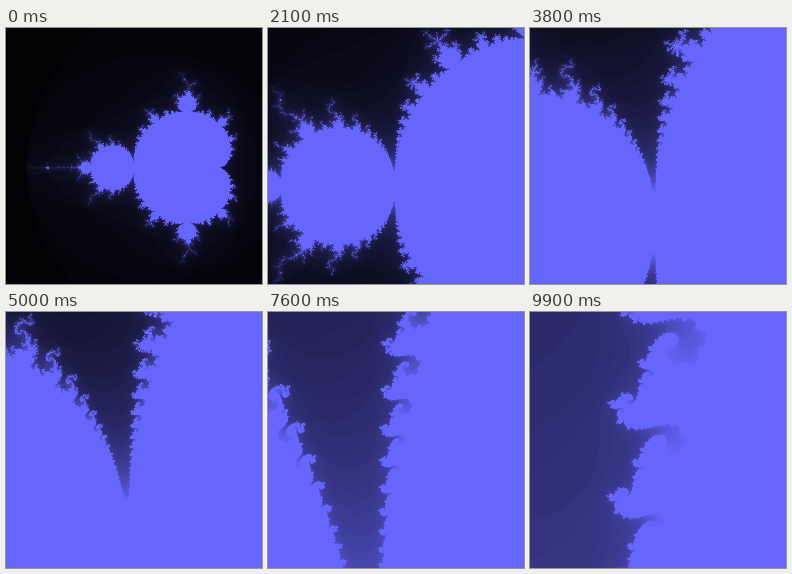
These frames come from a looping animation (256 px wide and 256 px high, 10 s). An HTML page with a canvas:

```html
<!DOCTYPE html>
<html lang="en">
<head>
<meta charset="utf-8">
<title>Seahorse valley zoom</title>
<style>
  html, body { margin: 0; width: 100%; height: 100%; overflow: hidden; background: #000; }
  canvas { display: block; width: 100vw; height: 100vh; }
</style>
</head>
<body>
<canvas id="view" width="256" height="256"></canvas>
<script>
const SIZE = 256;
const STEPS = 100;
const STEP_MS = 100;
const MAX_ITER = 50;
const MAX_ZOOM = 100;
const SPAN = 3;
const CENTER = { re: -0.7435, im: 0.1314 };
const FILL = { dim: 102, blue: 255 };

const ctx = document.getElementById('view').getContext('2d');
const image = ctx.createImageData(SIZE, SIZE);
const pixels = new Uint32Array(image.data.buffer);

// Little-endian ABGR, linear from black to the fill colour
const palette = Array.from({ length: MAX_ITER + 1 }, (_, n) => {
  const k = n / MAX_ITER;
  const dim = Math.floor(FILL.dim * k);
  const blue = Math.floor(FILL.blue * k);
  return (255 << 24 | blue << 16 | dim << 8 | dim) >>> 0;
});

function escapeCount(cr, ci) {
  let x = 0, y = 0, xx = 0, yy = 0, n = 0;
  while (n < MAX_ITER && xx + yy <= 4) {
    y = 2 * x * y + ci;
    x = xx - yy + cr;
    xx = x * x;
    yy = y * y;
    n++;
  }
  return n;
}

function draw(step) {
  const zoom = Math.pow(MAX_ZOOM, step / (STEPS - 1));
  const unit = SPAN / zoom / SIZE;
  let i = 0;
  for (let py = 0; py < SIZE; py++) {
    const ci = CENTER.im - (py - SIZE / 2) * unit;
    for (let px = 0; px < SIZE; px++) {
      const cr = CENTER.re + (px - SIZE / 2) * unit;
      pixels[i++] = palette[escapeCount(cr, ci)];
    }
  }
  ctx.putImageData(image, 0, 0);
}

let shown = -1;
const start = performance.now();

function tick() {
  const elapsed = Math.max(0, performance.now() - start);
  const step = Math.floor(elapsed / STEP_MS) % STEPS;
  if (step !== shown) draw(shown = step);
  requestAnimationFrame(tick);
}
tick();
</script>
</body>
</html>
```
